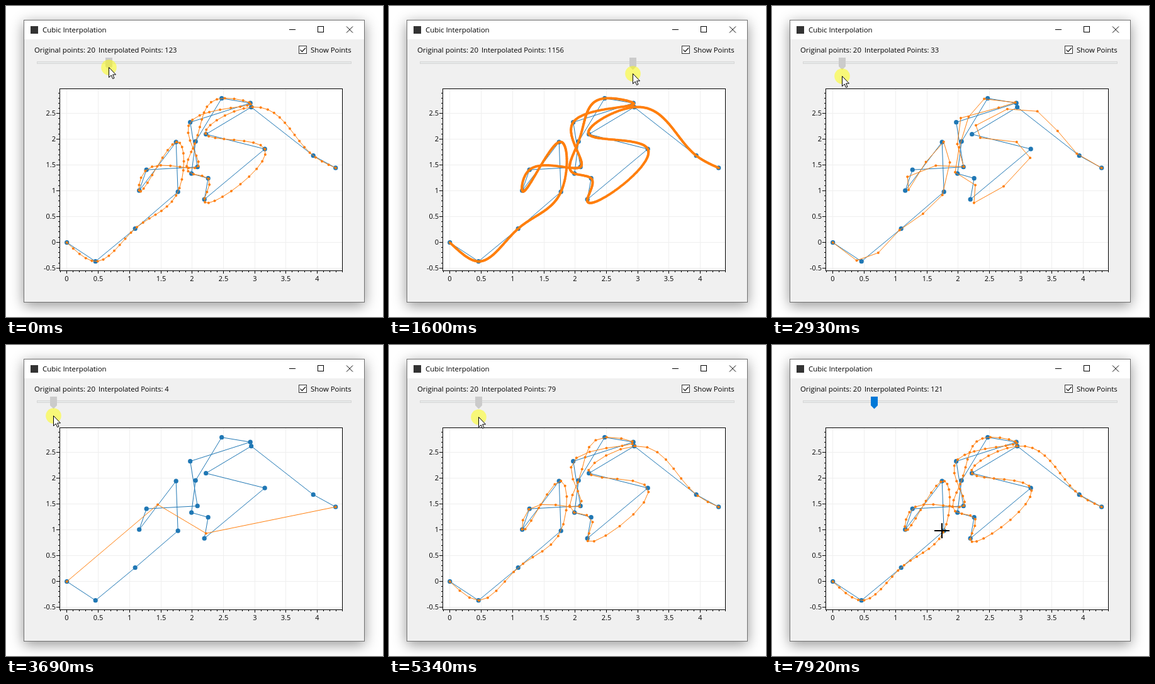
These frames come from a looping animation (599 by 494 pixels, 7.99 s). An HTML page with a canvas:

```html
<!DOCTYPE html>
<html lang="en">
<head>
<meta charset="utf-8">
<title>Cubic Interpolation</title>
<style>
  html, body { margin: 0; width: 100%; height: 100%; overflow: hidden; background: #fff; }
  canvas { display: block; }
</style>
</head>
<body>
<canvas id="stage" width="599" height="494"></canvas>
<script>
const ctx = document.getElementById('stage').getContext('2d');
const LOOP = 7990, HOLD = 70, RELEASE = 6950, SETTLED = 7920;
const BLUE = '#1f77b4', ORANGE = '#ff7f0e';
const UNIT_X = 99.45, UNIT_Y = 81.8, ZERO_X = 96.4, ZERO_Y = 375.3;
const PLOT = { left: 85, top: 131, right: 534, bottom: 420 };

const ARROW = new Path2D('M.5 .5V16.5L4.2 13L6.6 18.5L9 17.5L6.6 12H11.5Z');
const THUMB = new Path2D('M-5 82H6V96L.5 101.5L-5 96Z');

// The random walk, in stage pixels
const knots = [
  [96.5, 375.5], [142, 405.5], [205, 353.5], [273, 295], [270, 216], [211.5, 293], [223, 260],
  [304, 255.5], [292.5, 184.5], [388, 154], [342.5, 146.5], [301, 215], [294.5, 266], [321, 273.5],
  [315, 307], [411, 227], [317.5, 203.5], [389.5, 160.5], [488, 237.5], [523.5, 257]
].map(([x, y]) => [x + .2, y + .2]);

// Slider stops: time and interpolated point count
const stops = [
  [0, 123], [1600, 1156], [1850, 1330], [2930, 33], [3430, 4.4], [3690, 4.4],
  [4310, 27], [5340, 79], [5960, 121], [LOOP, 121]
];

function poseAt(t) {
  const i = stops.findIndex(s => t < s[0]);
  const [start, from] = stops[i - 1], [end, to] = stops[i];
  const held = start + Math.floor((t - start) / HOLD) * HOLD;
  const f = (held - start) / (end - start);
  const root = Math.sqrt(from) * (1 - f) + Math.sqrt(to) * f;   // count grows with the slider squared
  const thumb = Math.round(54.8 + root * 9.78);

  // The hand sinks slowly while dragging, then swings over to the plot
  const dragY = 97 + 18.5 * (1 - Math.exp(-Math.min(held, 5960) / 2200));
  const left = Math.min(1, Math.max(0, (held - RELEASE + HOLD) / (SETTLED - RELEASE)));
  const swing = t < RELEASE ? 0 : 1 - (1 - left) ** 2;
  const bow = 70 * Math.sin(Math.PI * swing);
  return {
    count: Math.round(root * root),
    thumb,
    x: Math.round(thumb + (270 - thumb) * swing + bow),
    y: Math.round(dragY + (295 - dragY) * swing + bow)
  };
}

// Natural cubic spline over chord length, measured in axis units
const dist = [0];
for (let i = 1; i < knots.length; i++) {
  dist[i] = dist[i - 1] + Math.hypot(
    (knots[i][0] - knots[i - 1][0]) / UNIT_X, (knots[i][1] - knots[i - 1][1]) / UNIT_Y);
}

function spline(s, v) {
  const last = s.length - 1, c = [0], d = [0], m = Array(last + 1).fill(0);
  for (let i = 1; i < last; i++) {
    const h0 = s[i] - s[i - 1], h1 = s[i + 1] - s[i];
    const rhs = 6 * ((v[i + 1] - v[i]) / h1 - (v[i] - v[i - 1]) / h0);
    const w = 2 * (h0 + h1) - h0 * c[i - 1];
    c[i] = h1 / w;
    d[i] = (rhs - h0 * d[i - 1]) / w;
  }
  for (let i = last - 1; i > 0; i--) m[i] = d[i] - c[i] * m[i + 1];
  return at => {
    let i = 0;
    while (i < last - 1 && at > s[i + 1]) i++;
    const h = s[i + 1] - s[i], a = (s[i + 1] - at) / h, b = 1 - a;
    return a * v[i] + b * v[i + 1] + ((a ** 3 - a) * m[i] + (b ** 3 - b) * m[i + 1]) * h * h / 6;
  };
}
const curveX = spline(dist, knots.map(p => p[0]));
const curveY = spline(dist, knots.map(p => p[1]));

function resample(count) {
  const step = dist[dist.length - 1] / (count - 1);
  return Array.from({ length: count }, (_, i) => [curveX(i * step), curveY(i * step)]);
}

function rect(x, y, w, h, fill) {
  ctx.fillStyle = fill;
  ctx.fillRect(x, y, w, h);
}

// One-pixel border just inside the given box
function border(x, y, w, h, color) {
  ctx.strokeStyle = color;
  ctx.lineWidth = 1;
  ctx.strokeRect(x + .5, y + .5, w - 1, h - 1);
}

function path(points, color, width = 1) {
  ctx.beginPath();
  points.forEach(p => ctx.lineTo(p[0], p[1]));
  ctx.strokeStyle = color;
  ctx.lineWidth = width;
  ctx.stroke();
}

function text(str, x, y, size = 11.4, align = 'left') {
  ctx.font = `${size}px "Open Sans", sans-serif`;
  ctx.textAlign = align;
  ctx.fillStyle = '#000';
  ctx.fillText(str, x, y);
}

function disc(x, y, radius, color) {
  ctx.fillStyle = color;
  ctx.beginPath();
  ctx.arc(x, y, radius, 0, 2 * Math.PI);
  ctx.fill();
}

function series(points, color, radius) {
  path(points, color);
  points.forEach(([x, y]) => disc(x, y, radius, color));
}

function drawWindow() {
  rect(0, 0, 599, 494, '#fff');
  ctx.save();
  ctx.shadowColor = 'rgba(0,0,0,.42)';
  ctx.shadowBlur = 20;
  ctx.shadowOffsetY = 5;
  rect(28, 22, 542, 449, '#fff');
  ctx.restore();
  rect(29, 53, 540, 417, '#f0f0f0');
  border(28, 22, 542, 449, '#707070');

  rect(39, 32, 12, 12, '#333');
  text('Cubic Interpolation', 58, 42);
  path([[450, 37.5], [460, 37.5]], '#000');
  border(495, 32, 10, 10, '#000');
  path([[541, 32.5], [551, 42.5]], '#000');
  path([[551, 32.5], [541, 42.5]], '#000');

  text('Original points: 20', 45, 74);
  rect(465, 63, 13, 13, '#fff');
  border(465, 63, 13, 13, '#333');
  path([[467.5, 69.5], [470.5, 72.5], [476, 66.5]], '#222', 1.3);
  text('Show Points', 484, 74);
  rect(49, 88, 500, 4, '#e7eaea');
  border(49, 88, 500, 4, '#d6d6d6');
}

function drawAxes() {
  const { left, top, right, bottom } = PLOT;
  const px = v => Math.round(ZERO_X + v * UNIT_X) + .5;
  const py = v => Math.floor(ZERO_Y - v * UNIT_Y) + .5;
  rect(left, top, right - left, bottom - top, '#fff');
  for (let v = 0; v <= 4; v += .5) path([[px(v), top], [px(v), bottom]], '#efefef');
  for (let v = -.5; v <= 2.5; v += .5) path([[left, py(v)], [right, py(v)]], '#efefef');
  for (let i = -1; i <= 44; i++) {
    const x = px(i / 10), major = i % 5 === 0;
    path([[x, bottom], [x, bottom + (major ? 5 : 3)]], '#000');
    if (major) text(String(i / 10), x, 436.5, 11, 'center');
  }
  for (let i = -5; i <= 29; i++) {
    const y = py(i / 10), major = i % 5 === 0;
    path([[left, y], [left - (major ? 5 : 2), y]], '#000');
    if (major) text(String(i / 10), 79, y + 3.5, 11, 'right');
  }
  border(left, top, right - left + 1, bottom - top + 1, '#000');
}

function drawThumb(x, color) {
  ctx.save();
  ctx.translate(x, 0);
  ctx.fillStyle = color;
  ctx.fill(THUMB);
  ctx.restore();
}

function drawPointer(x, y, pressed) {
  if (!pressed) {
    rect(x - 12, y - 1, 24, 2, '#000');
    rect(x - 1, y - 12, 2, 24, '#000');
    return;
  }
  disc(x + .5, y + .5, 12.3, 'rgba(255,255,0,.5)');
  ctx.save();
  ctx.translate(x, y);
  ctx.fillStyle = '#fff';
  ctx.fill(ARROW);
  ctx.strokeStyle = '#000';
  ctx.lineWidth = 1;
  ctx.stroke(ARROW);
  ctx.restore();
}

function draw(now) {
  const t = now % LOOP, pose = poseAt(t), pressed = t < RELEASE;
  drawWindow();
  text(`Interpolated Points: ${pose.count}`, 147, 74, 11.15);
  drawThumb(pose.thumb, pressed ? '#cbcbcb' : '#0078d7');
  drawAxes();
  series(knots, BLUE, 3.6);
  series(resample(pose.count), ORANGE, 2);
  drawPointer(pose.x, pose.y, pressed);
  requestAnimationFrame(() => draw(performance.now()));
}
draw(0);
</script>
</body>
</html>
```
